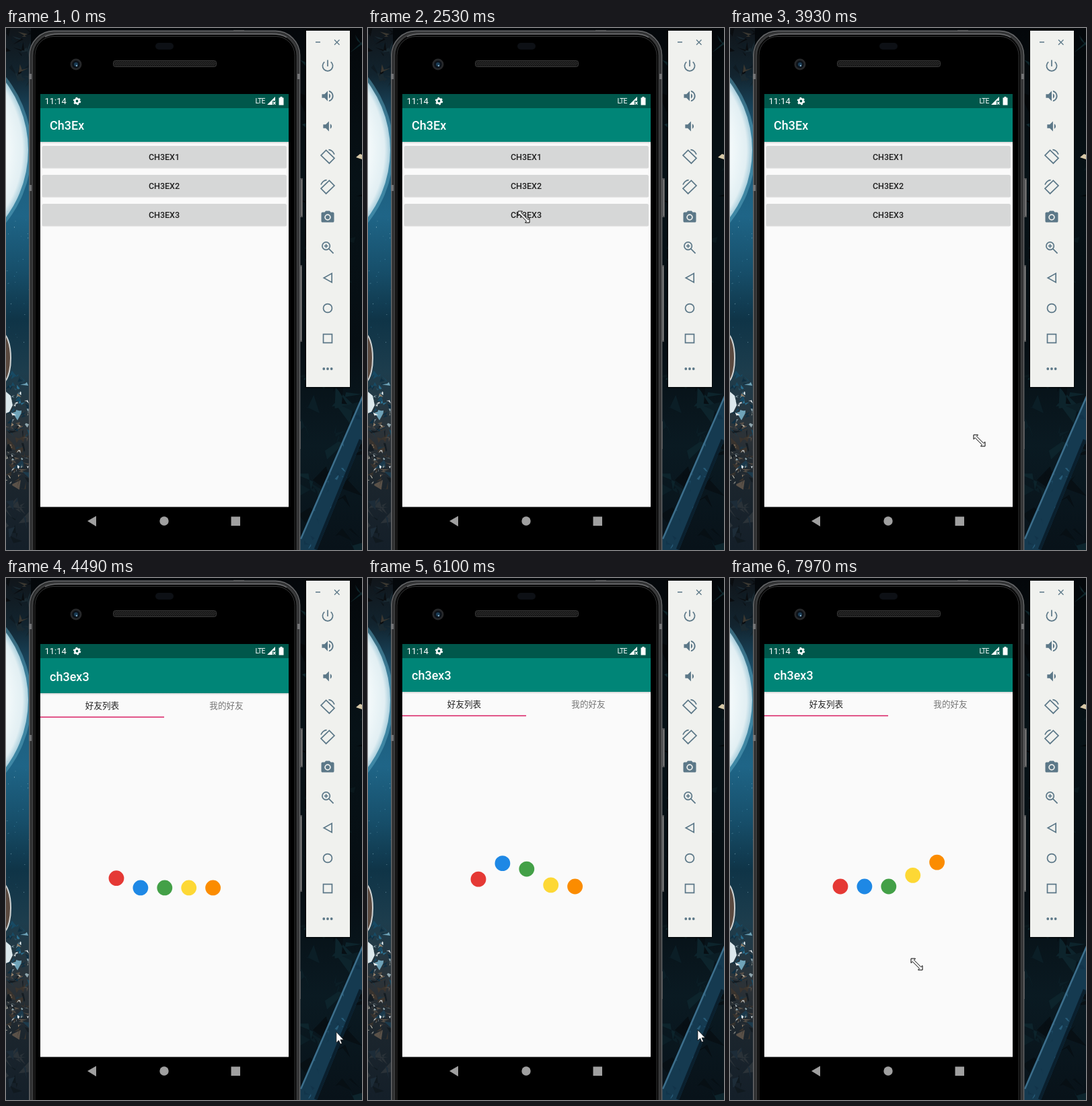
Recreate the animation shown at these times as an HTML page. Size 529x775 px, loop 8 s.

```html
<!DOCTYPE html>
<html lang="en">
<head>
<meta charset="utf-8">
<title>Emulator</title>
<style>
html, body { margin: 0; width: 100%; height: 100%; overflow: hidden; background: #05080d; }
svg { display: block; width: 100%; height: 100%; }
text { font-family: Roboto, "Noto Sans CJK SC", "Noto Sans CJK", sans-serif; }
.title { font-size: 18px; font-weight: 500; fill: #fff; }
.btn { font-size: 12.5px; font-weight: 500; fill: #212121; text-anchor: middle; }
.tab { font-family: "Noto Sans CJK SC", "Noto Sans CJK", sans-serif; font-size: 12.6px; text-anchor: middle; }
.line { fill: none; stroke: #5c7888; stroke-width: 1.8; }
.solid { fill: #5c7888; }
</style>
</head>
<body>
<svg viewBox="0 0 529 775" preserveAspectRatio="none">
  <defs>
    <linearGradient id="sky" x1="0" y1="0" x2="0" y2="1">
      <stop offset="0" stop-color="#10151a"/>
      <stop offset=".09" stop-color="#12242f"/>
      <stop offset=".2" stop-color="#1d5877"/>
      <stop offset=".36" stop-color="#1f6587"/>
      <stop offset=".46" stop-color="#17506c"/>
      <stop offset=".56" stop-color="#0f3447"/>
      <stop offset=".66" stop-color="#1d3d4d"/>
      <stop offset=".78" stop-color="#2c3237"/>
      <stop offset=".88" stop-color="#1b252d"/>
      <stop offset="1" stop-color="#141f29"/>
    </linearGradient>
    <radialGradient id="moon">
      <stop offset=".8" stop-color="#f4fafb"/>
      <stop offset=".95" stop-color="#e2eff3"/>
      <stop offset="1" stop-color="#a9cfdd"/>
    </radialGradient>
    <linearGradient id="dusk" x1="0" y1="0" x2="0" y2="1">
      <stop offset="0" stop-color="#04070a"/>
      <stop offset=".3" stop-color="#071217"/>
      <stop offset=".6" stop-color="#060e13"/>
      <stop offset=".8" stop-color="#0a1a22"/>
      <stop offset="1" stop-color="#081219"/>
    </linearGradient>
    <linearGradient id="shade" x1="0" y1="0" x2="0" y2="1">
      <stop offset="0" stop-color="#000" stop-opacity=".16"/>
      <stop offset="1" stop-color="#000" stop-opacity="0"/>
    </linearGradient>
    <pattern id="mesh" width="3" height="3" patternUnits="userSpaceOnUse">
      <path d="M0 3L3 0" stroke="#3b3b3b" stroke-width=".8"/>
    </pattern>
    <clipPath id="left"><path d="M0 0H37V775H0z"/></clipPath>
    <clipPath id="beam"><path d="M529 546V612L462 775H437V758z"/></clipPath>
    <clipPath id="screen"><path d="M51 119H420V711H51z"/></clipPath>
    <clipPath id="third"><rect x="54" y="261" width="363" height="32" rx="2"/></clipPath>
  </defs>

  <path fill="url(#dusk)" d="M0 0H529V775H0z"/>
  <g clip-path="url(#left)">
    <path fill="url(#sky)" d="M0 0H37V775H0z"/>
    <g id="leaves"/>
    <circle cx="-135" cy="181" r="173" fill="#5fa9c4" opacity=".5"/>
    <circle cx="-135" cy="181" r="168" fill="url(#moon)"/>
    <g id="stars"/>
    <g id="debris"/>
    <ellipse cx="-6" cy="490" rx="13" ry="37" fill="#5b4a40" stroke="#cfd3d3" stroke-width="2"/>
    <path fill="#dce8ec" d="M0 540l7 6 3 14-5 10-5 2z"/>
  </g>
  <g id="shards"/>
  <g clip-path="url(#beam)">
    <path fill="#153a50" d="M437 540H529V775H437z"/>
    <g id="grain"/>
    <path stroke="#3d6f8c" stroke-width="5" d="M529 546L437 758"/>
    <path stroke="#0a1f2d" stroke-width="9" d="M529 612L462 775"/>
  </g>
  <path fill="#d8c9a8" d="M520 192l6-5 3 1v7z"/>

  <!-- phone -->
  <g fill="#4c4d4f">
    <path d="M436 223h5v58h-5zM436 352h4v114h-4zM435 584h3v41h-3zM338 3h16v4h-16z"/>
    <path fill="#8a8a8a" d="M439 225h1v54h-1zM438 354h1v110h-1z"/>
  </g>
  <rect x="35" y="4.500" width="401.500" height="820" rx="36" fill="#242526" stroke="#5f6062" stroke-width="1.800"/>
  <rect x="39" y="8" width="394" height="820" rx="33" fill="#070707" stroke="#3a3b3c" stroke-width="3"/>
  <rect x="43" y="12.500" width="386" height="820" rx="28" fill="#000" stroke="#8a8c8e" stroke-width=".8" stroke-opacity=".45"/>
  <path fill="none" stroke="#9b9da0" stroke-width="1.500" d="M58 13Q66 9 78 9H395Q410 9 417 14" opacity=".6"/>
  <path fill="#737476" d="M34 68h4v8h-4zM34 233h4v9h-4zM433 68h4v8h-4z"/>
  <rect x="222" y="22" width="27" height="10" rx="5" fill="#0d1015"/>
  <circle cx="104" cy="54" r="8.500" fill="#27282a"/>
  <circle cx="104" cy="54" r="5.800" fill="#0c1219"/>
  <circle cx="104" cy="54" r="3" fill="#1b3c55"/>
  <circle cx="105" cy="56" r="1.200" fill="#86aec6"/>
  <rect x="159.500" y="48.500" width="153" height="9" rx="3" fill="#161616" stroke="#3c3c3c"/>
  <rect x="161" y="50" width="150" height="6" rx="2" fill="url(#mesh)"/>

  <!-- screen -->
  <path fill="#fafafa" d="M51 98H420V711H51z"/>
  <path fill="#00574b" d="M51 98H420V119H51z"/>
  <g fill="#fff">
    <text x="57.500" y="113.300" font-size="13">11:14</text>
    <circle cx="105.500" cy="108.500" r="3.200" fill="none" stroke="#fff" stroke-width="2.600"/>
    <circle cx="105.500" cy="108.500" r="4.900" fill="none" stroke="#fff" stroke-width="1.800" stroke-dasharray="2.566"/>
    <text x="370.500" y="112" font-size="10.500" letter-spacing="-.8">LTE</text>
    <path d="M400 102V108H396V114H388z"/>
    <path d="M397 109.500l3.500 4M400.500 109.500l-3.500 4" stroke="#fff" stroke-width="1.200"/>
    <path d="M405.500 103.500h2v-1.500h3v1.500h2V114.500h-7z"/>
  </g>
  <g clip-path="url(#screen)">
    <g id="home">
      <path fill="#008577" d="M51 119H420V169H51z"/>
      <path fill="url(#shade)" d="M51 169H420V172H51z"/>
      <text class="title" x="65" y="151">Ch3Ex</text>
      <g id="buttons"/>
      <circle id="ripple" cx="231" cy="280" fill="#000" clip-path="url(#third)"/>
      <text class="btn" x="235" y="282">CH3EX3</text>
    </g>
    <g id="friends">
      <path fill="#fafafa" d="M51 119H420V740H51z"/>
      <path fill="#008577" d="M51 119H420V169H51z"/>
      <path fill="url(#shade)" d="M51 169H420V172H51z"/>
      <text class="title" x="65" y="151">ch3ex3</text>
      <text class="tab" x="143" y="192" fill="#212121">好友列表</text>
      <text class="tab" x="327.500" y="192" fill="#757575">我的好友</text>
      <path fill="#d81b60" d="M51 203.800H235V205.300H51z"/>
      <g id="balls"/>
    </g>
  </g>
  <path fill="#c4c4c4" d="M51 710.500H420V711.300H51z"/>
  <g fill="#a0a0a0">
    <path d="M121 732L134 724.500V740z"/>
    <circle cx="235" cy="732" r="6.700"/>
    <path d="M334.500 725.500h13.500v13.500h-13.500z"/>
  </g>

  <!-- side panel -->
  <path fill="#000" opacity=".6" d="M444.500 4H512V534.500H444.500z"/>
  <path fill="#f0f1ee" d="M446 4H511V533H446z"/>
  <path class="line" style="stroke-width:1.3" d="M460 21h7M488 17.500l7.500 7.500M495.500 17.500l-7.500 7.500"/>
  <g id="tools"/>

  <circle id="press" cx="231" cy="280" r="15" fill="#ff0" fill-opacity=".47"/>
  <path id="resize" fill="#fff" stroke="#000" d="M-8.500-8.500H-2L-4-6.300 6.300 4 8.500 2V8.500H2L4 6.300-6.300-4-8.500-2z"/>
  <path id="arrow" fill="#fff" stroke="#111" stroke-width=".8" d="M0 0V16l3.700-3.500 2.400 5.600 2.400-1-2.400-5.400h5z"/>
</svg>
<script>
const $ = id => document.getElementById(id);

function add(parent, tag, attrs, text) {
  const el = document.createElementNS('http://www.w3.org/2000/svg', tag);
  for (const k in attrs) el.setAttribute(k, attrs[k]);
  if (text) el.textContent = text;
  return parent.appendChild(el);
}

let seed = 11;
const rnd = (a, b) => {
  seed = (seed * 16807) % 2147483647;
  return a + (b - a) * seed / 2147483647;
};

function scatter(id, count, x0, x1, y0, y1, size, colors) {
  for (let i = 0; i < count; i++) {
    const x = rnd(x0, x1), y = rnd(y0, y1);
    const p = () => `${rnd(-size, size).toFixed(1)} ${rnd(-size, size).toFixed(1)}`;
    add($(id), 'path', {
      d: `M${p()}L${p()}L${p()}L${p()}z`,
      transform: `translate(${x.toFixed(1)} ${y.toFixed(1)})`,
      fill: colors[Math.floor(rnd(0, colors.length))]
    });
  }
}

scatter('leaves', 22, 0, 36, 0, 80, 10, ['#0a0d10', '#1a2a32', '#3b3831', '#0f1b23']);
scatter('stars', 34, 0, 36, 270, 470, 1, ['#5fa5c0', '#3f8fae', '#9cc4d2']);
scatter('debris', 24, 0, 36, 515, 610, 8, ['#2b6f8f', '#174a64', '#0f2f42', '#6fa3b8']);
scatter('debris', 40, 0, 36, 590, 680, 9, ['#2a3036', '#3a342e', '#1c3a4c', '#5a5148', '#141c22']);
scatter('debris', 34, 0, 34, 540, 680, 4, ['#c9c4b4', '#e8eef0', '#8fa5ad', '#8f7d68']);
scatter('debris', 14, 0, 36, 690, 775, 12, ['#1d2c38', '#10191f', '#2a3238']);
scatter('shards', 30, 440, 529, 0, 540, 18, ['#0a181d', '#0d2429', '#030608', '#122c32']);
scatter('shards', 26, 440, 529, 530, 775, 20, ['#0d242c', '#0b1e26', '#070f14']);
scatter('grain', 70, 437, 529, 546, 775, 5, ['#1f4d68', '#12344a', '#285d7a']);

[175, 218, 261].forEach((y, i) => {
  const g = $('buttons');
  add(g, 'rect', { x: 53.5, y: y + .5, width: 363.5, height: 33, rx: 2, fill: '#000', opacity: .13 });
  add(g, 'rect', { x: 54, y, width: 362.5, height: 32, rx: 2, fill: '#d6d7d7' });
  if (i < 2) add(g, 'text', { class: 'btn', x: 235, y: y + 21 }, 'CH3EX' + (i + 1));
});

// Icons on a 24 unit grid: [class, path, flip]
const speaker = 'v6h4l5 5V4L7 9z';
const rotate = 'M1.500 10L9.500 2 22.500 14.500 14.500 22.500zM13.500 1Q20 2 22.500 8.500';
const icons = [
  ['line', 'M12 3V13M7 6A8 8 0 1 0 17 6'],
  ['solid', 'M3 9' + speaker + 'M14 8a4.500 4.500 0 0 1 0 8zM14 3.200a9 9 0 0 1 0 17.600v-2.100a7 7 0 0 0 0-13.400z'],
  ['solid', 'M5 9v6h4l5 5V4L9 9zM16 8a4.500 4.500 0 0 1 0 8z'],
  ['line', rotate],
  ['line', rotate, 'scale(-1 1)'],
  ['solid', 'M9 2L7.200 4H4a2 2 0 0 0-2 2V18a2 2 0 0 0 2 2H20a2 2 0 0 0 2-2V6a2 2 0 0 0-2-2H16.800L15 2zM12 7a5 5 0 1 1 0 10 5 5 0 1 1 0-10zM12 8.800a3.200 3.200 0 1 0 0 6.400 3.200 3.200 0 1 0 0-6.400z'],
  ['line', 'M9.500 3.500a6 6 0 1 1 0 12 6 6 0 1 1 0-12zM14 14l7 7M9.500 6.500v6M6.500 9.500h6'],
  ['line', 'M18.500 5V19L6 12z'],
  ['line', 'M12 5.200a6.800 6.800 0 1 1 0 13.600 6.800 6.800 0 1 1 0-13.600z'],
  ['line', 'M5.200 5.200H18.800V18.800H5.200z'],
  ['solid', [6, 12, 18].map(x => `M${x - 2} 12a2 2 0 1 1 4 0 2 2 0 1 1-4 0z`).join('')]
];
icons.forEach(([cls, d, flip = ''], i) => add($('tools'), 'path', {
  class: cls, d, 'fill-rule': 'evenodd',
  transform: `translate(478 ${56 + 45 * i}) scale(.95) ${flip} translate(-12 -12)`
}));

const balls = ['#e53935', '#1e88e5', '#43a047', '#fdd835', '#fb8c00'].map((fill, i) =>
  add($('balls'), 'circle', { cx: 164 + 35.9 * i, r: 11.4, fill }));

// Stretches of screen updates: start, end, number of steps
const runs = [
  [580, 1350, 11], [1420, 2060, 9], [2440, 2530, 2], [2770, 2990, 4], [3540, 4330, 11], [4400, 4640, 4],
  [4790, 4950, 3], [5100, 5860, 11], [5950, 6720, 11], [6800, 7580, 11], [7670, 7970, 5]
];

function snap(t) {
  let at = 0;
  for (const [a, b, n] of runs) {
    if (t < a) break;
    const step = (b - a) / (n - 1);
    at = a + step * Math.min(n - 1, Math.floor((t - a) / step + .15));
  }
  return at;
}

// Piecewise linear value from keys [time, ...values]
function along(keys, t, k = 1) {
  let i = 0;
  while (i < keys.length - 2 && t > keys[i + 1][0]) i++;
  const a = keys[i], b = keys[i + 1];
  const f = Math.min(1, Math.max(0, (t - a[0]) / (b[0] - a[0])));
  return a[k] + (b[k] - a[k]) * f;
}

const pointer = [
  [580, 419, 768], [960, 345, 545], [1350, 263, 334], [1420, 261, 331], [2060, 231.5, 280.5],
  [3460, 231.5, 280.5], [3935, 370.5, 612.5], [4330, 484, 672], [4640, 498, 676], [4950, 496, 674],
  [5250, 492, 672], [6100, 490, 671], [6250, 489, 670], [6720, 300, 474],
  [7034, 290.5, 487.5], [7580, 281, 549], [7970, 277.5, 573.5]
];
const beat = [[4340, 0], [5252, 1.41], [6104, 2.815], [7034, 4.128], [7970, 5.5]];
const ripple = [[2690, 0, 0], [2770, 70, .1], [2840, 140, .12], [2920, 200, .07], [2990, 200, 0]];

const show = (id, on) => $(id).setAttribute('visibility', on ? 'visible' : 'hidden');

function draw(time) {
  const t = snap(time);

  const x = along(pointer, t, 1), y = along(pointer, t, 2);
  const outside = x > 437;
  show('resize', t >= 580 && !outside);
  show('arrow', t >= 580 && outside);
  $(outside ? 'arrow' : 'resize').setAttribute('transform', `translate(${x} ${y})`);

  show('press', t >= 2440 && t < 2530);
  $('ripple').setAttribute('r', along(ripple, t, 1));
  $('ripple').setAttribute('opacity', along(ripple, t, 2));

  const open = Math.min(1, Math.max(0, (t - 4270) / 370));
  const ease = 1 - (1 - open) ** 3;
  $('friends').setAttribute('opacity', Math.min(1, open * 1.8));
  $('friends').setAttribute('transform', `translate(0 ${24 * (1 - ease)})`);

  const phase = along(beat, t);
  balls.forEach((ball, i) => {
    const u = (phase - .246 * i + 2) % 2;
    ball.setAttribute('cy', 458 - (u < 1 ? 36 * Math.sin(Math.PI * u) ** 2 : 0));
  });
}

function loop() {
  draw(performance.now() % 8000);
  requestAnimationFrame(loop);
}
loop();
</script>
</body>
</html>
```
